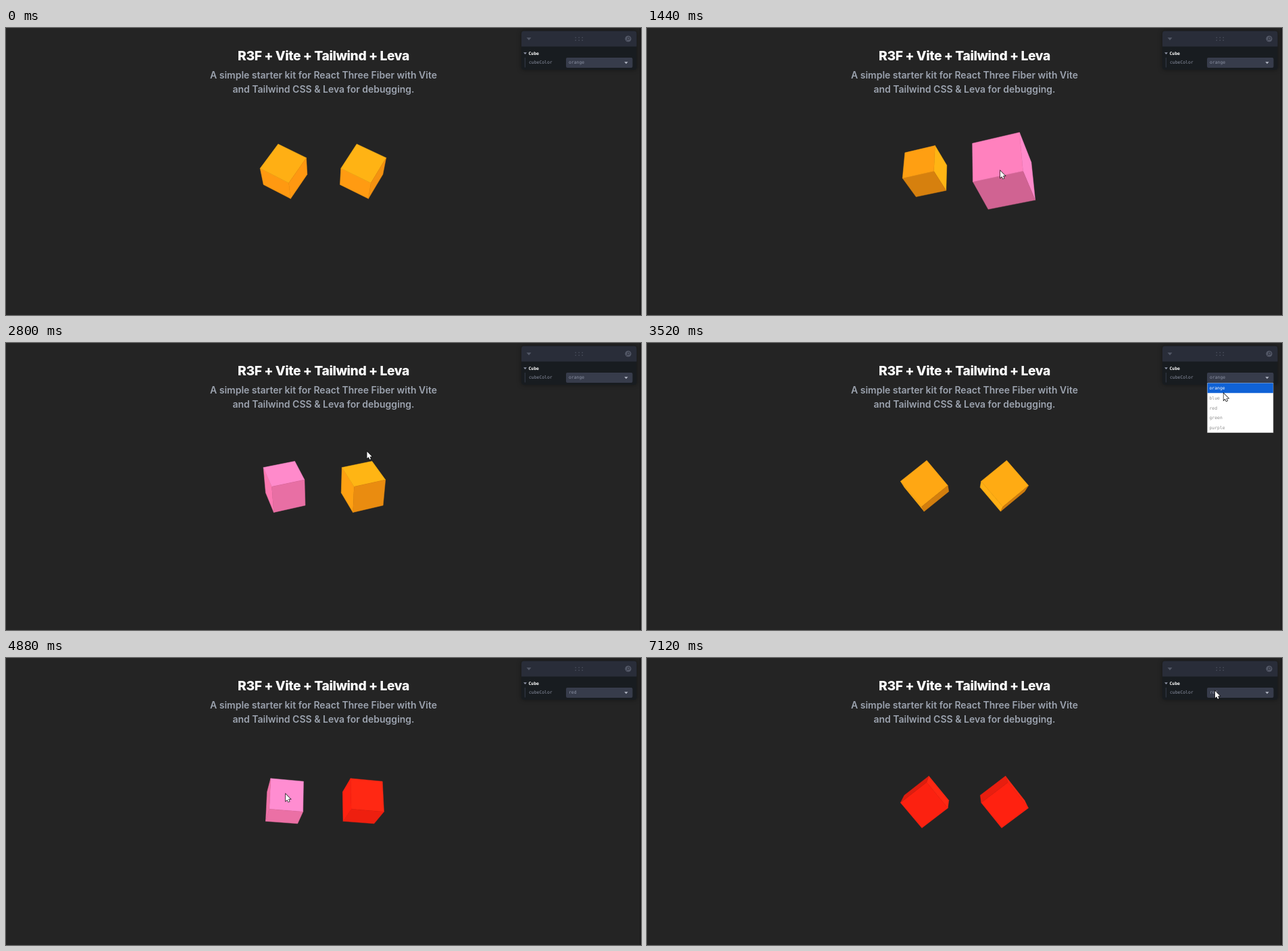
These frames come from a looping animation (940x426 px, 7.2 s). An HTML page with a canvas:

```html
<!DOCTYPE html>
<html lang="en">
<head>
<meta charset="utf-8">
<title>Cube starter</title>
<style>
html, body { margin: 0; width: 100%; height: 100%; overflow: hidden; background: #242424; }
canvas { display: block; }
</style>
</head>
<body>
<canvas id="stage" width="940" height="426"></canvas>
<script>
const ctx = document.getElementById('stage').getContext('2d');
const LOOP = 7200, STEP = 80;
const CENTER = { x: 470, y: 213 };
const UNIT = 48.2, CAMERA = 16;
const SANS = 'Inter, sans-serif', MONO = '"DejaVu Sans Mono", monospace';
const OPTIONS = ['orange', 'blue', 'red', 'green', 'purple'];
const ROW = 14.7, LIST_TOP = 59.5;

// Unlit material colours; lights scale them up.
const TINT = { orange: [207, 124, 14], red: [208, 27, 13], pink: [203, 97, 143] };

const place = (x, y) => ({ x, y });
const LEFT = place(414, 202), RIGHT = place(523, 212), GAP = place(460, 213);
const ENTRY = place(440, 418), NAME = place(788, 54);
const SELECT = place(868, 48), OPTION = place(842, 96), REST = place(841, 49);

// The pointer stays at each place for a while and glides between them.
const visit = (at, from, to = from + STEP) => ({ at, from, to });
const VISITS = [
  visit(ENTRY, 160), visit(LEFT, 400, 960), visit(RIGHT, 1040, 1840),
  visit(LEFT, 1920, 2000), visit(GAP, 2080), visit(LEFT, 2320, 2720),
  visit(SELECT, 3280), visit(OPTION, 3840, 3920), visit(LEFT, 4800, 5280),
  visit(NAME, 5760), visit(SELECT, 6160), visit(OPTION, 6560, 6720),
  visit(REST, 7120)
];
const PICKED = VISITS.find(v => v.at === OPTION).to;
const CUBES = [{ x: -1.2, spot: LEFT }, { x: 1.2, spot: RIGHT }];

const dot = (a, b) => a[0] * b[0] + a[1] * b[1] + a[2] * b[2];
const cross = (a, b) => [
  a[1] * b[2] - a[2] * b[1], a[2] * b[0] - a[0] * b[2], a[0] * b[1] - a[1] * b[0]
];
const easeOut = k => 1 - (1 - k) ** 2;
const nextVisit = t => VISITS.findIndex(v => v.to > t);

function pointerAt(t) {
  if (t < VISITS[0].from) return null;
  const i = nextVisit(t), next = VISITS[i];
  if (t >= next.from) return next.at;
  const last = VISITS[i - 1];
  const k = easeOut((t - last.to) / (next.from - last.to));
  return place(last.at.x + (next.at.x - last.at.x) * k, last.at.y + (next.at.y - last.at.y) * k);
}

// A click soon after arriving enlarges the cube; one before leaving restores it.
const isActive = (cube, t) =>
  VISITS.some(v => v.at === cube.spot && t >= v.from + 2 * STEP && t < v.to - STEP);

function polygon(points, fill, stroke) {
  ctx.beginPath();
  points.forEach(([x, y]) => ctx.lineTo(x, y));
  ctx.closePath();
  if (stroke) {
    ctx.strokeStyle = stroke;
    ctx.stroke();
  }
  ctx.fillStyle = fill;
  ctx.fill();
}

function box(x, y, w, h, radius, fill) {
  ctx.beginPath();
  ctx.roundRect(x, y, w, h, radius);
  ctx.fillStyle = fill;
  ctx.fill();
}

function label(text, x, y, font, fill, spacing = 0, align = 'left') {
  ctx.font = font;
  ctx.letterSpacing = spacing + 'px';
  ctx.textAlign = align;
  ctx.fillStyle = fill;
  ctx.fillText(text, x, y);
}

const mono = (text, x, y, fill, weight = 400) =>
  label(text, x, y, `${weight} 6.4px ${MONO}`, fill);

function caret(x, y, size, fill) {
  polygon([[x - size, y - size / 2], [x + size, y - size / 2], [x, y + size / 2 + 0.5]], fill);
}

// Local axes after turning about x, then half as far about y.
function axesAt(t) {
  const ax = 10.465 + 0.99 * t / 1000, ay = ax / 2;
  const sx = Math.sin(ax), cx = Math.cos(ax), sy = Math.sin(ay), cy = Math.cos(ay);
  return [[cy, sx * sy, -cx * sy], [0, cx, sx], [sy, -sx * cy, cx * cy]];
}

function project([x, y, z]) {
  const k = UNIT * CAMERA / (CAMERA - z);
  return [CENTER.x + x * k, CENTER.y - y * k];
}

// One light in front at upper right, one behind at lower left.
function lightOn(point, normal) {
  return [10, -10].reduce((sum, p) => {
    const ray = point.map(v => p - v);
    return sum + Math.max(0, dot(normal, ray) / Math.hypot(...ray));
  }, 0);
}

function drawCube(cube, axes, size, tint) {
  const half = size / 2;
  const at = (...dirs) => [0, 1, 2].map(i =>
    (i ? 0 : cube.x) + half * dirs.reduce((sum, d) => sum + d[i], 0));
  for (let i = 0; i < 3; i++) {
    for (const sign of [1, -1]) {
      const n = axes[i].map(v => v * sign);
      const mid = at(n);
      if (dot(n, [-mid[0], -mid[1], CAMERA - mid[2]]) <= 0) continue;
      const u = axes[(i + 1) % 3], v = cross(n, u);
      const nu = u.map(c => -c), nv = v.map(c => -c);
      const corners = [at(n, u, v), at(n, nu, v), at(n, nu, nv), at(n, u, nv)].map(project);
      const gain = 1 + 0.55 * lightOn(mid, n);
      const fill = `rgb(${tint.map(c => Math.min(255, Math.round(c * gain))).join()})`;
      ctx.lineWidth = 0.5;
      polygon(corners, fill, fill);
    }
  }
}

function drawHeading() {
  label('R3F + Vite + Tailwind + Leva', CENTER.x, 48, `800 19.3px ${SANS}`, '#fff', -0.45, 'center');
  const font = `600 14px ${SANS}`;
  label('A simple starter kit for React Three Fiber with Vite', CENTER.x, 74.5, font, '#9ca3af', 0, 'center');
  label('and Tailwind CSS & Leva for debugging.', CENTER.x, 96, font, '#9ca3af', 0, 'center');
}

function drawPanel(value) {
  ctx.shadowColor = 'rgba(0,0,0,.4)';
  ctx.shadowBlur = 7;
  box(763, 4.5, 170.5, 57.5, 4, '#181c20');
  ctx.shadowBlur = 0;
  box(763, 4.5, 170.5, 23, [4, 4, 0, 0], '#292d39');

  caret(774, 16, 3.5, '#535867');
  for (let i = 0; i < 6; i++) box(842.5 + (i % 3) * 5, 13.5 + (i > 2 ? 4 : 0), 1.4, 1.4, 0.6, '#535867');
  ctx.beginPath();
  ctx.arc(921, 16, 4.6, 0, 7);
  ctx.fillStyle = '#535867';
  ctx.fill();
  ctx.beginPath();
  ctx.arc(921.6, 15.4, 1.8, 0, 7);
  ctx.moveTo(920.2, 16.8);
  ctx.lineTo(918.4, 18.6);
  ctx.strokeStyle = '#292d39';
  ctx.lineWidth = 1;
  ctx.stroke();

  caret(768.5, 37.5, 2.4, '#8c92a4');
  mono('Cube', 773.5, 40, '#fefefe', 700);
  box(767.8, 44, 1, 14.5, 0, '#373c4b');
  mono('cubeColor', 774, 53, '#8c92a4');
  box(829, 44, 98.5, 15, 2, '#373c4b');
  mono(value, 833, 53, '#8c92a4');
  caret(918, 51.5, 2.7, '#b4b9c6');
}

function drawMenu(selected) {
  box(829, 59, 98.5, 74.5, 0, '#777');
  box(829.7, LIST_TOP, 97.2, 5 * ROW, 0, '#fff');
  box(829.7, LIST_TOP + selected * ROW, 97.2, ROW, 0, '#1062d6');
  OPTIONS.forEach((name, i) =>
    mono(name, 832.5, LIST_TOP + i * ROW + 9.6, i === selected ? '#fff' : '#8c8c8c'));
}

function drawPointer({ x, y }) {
  const outline = [[0, 0], [0, 10.2], [2.3, 8.2], [3.9, 11.7], [5.6, 11], [4, 7.5], [7.2, 7.3]];
  ctx.lineWidth = 1.4;
  polygon(outline.map(([dx, dy]) => [x + dx, y + dy]), '#fff', '#111');
}

function draw(t) {
  const pointer = pointerAt(t);
  const felt = pointerAt(t - STEP); // the page reacts one step late
  const value = t < PICKED ? 'orange' : 'red';

  ctx.fillStyle = '#242424';
  ctx.fillRect(0, 0, 940, 426);
  ctx.fillStyle = '#1c1b1c';
  ctx.fillRect(938, 0, 2, 426);
  drawHeading();

  const axes = axesAt(t);
  for (const cube of CUBES) {
    const size = isActive(cube, t) ? 1.5 : 1;
    const reach = 32 * size;
    const hovered = felt && Math.hypot(felt.x - CENTER.x - cube.x * UNIT, felt.y - CENTER.y) < reach;
    drawCube(cube, axes, size, TINT[hovered ? 'pink' : value]);
  }

  drawPanel(value);
  if (pointer && VISITS[nextVisit(t)].at === OPTION) {
    const row = Math.floor((felt.y - LIST_TOP) / ROW);
    drawMenu(row < 0 ? OPTIONS.indexOf(value) : Math.min(row, 4));
  }
  if (pointer) drawPointer(pointer);
}

const start = performance.now();
function tick() {
  const t = (performance.now() - start) % LOOP;
  draw(Math.floor(t / STEP) * STEP);
  requestAnimationFrame(tick);
}
tick();
</script>
</body>
</html>
```
